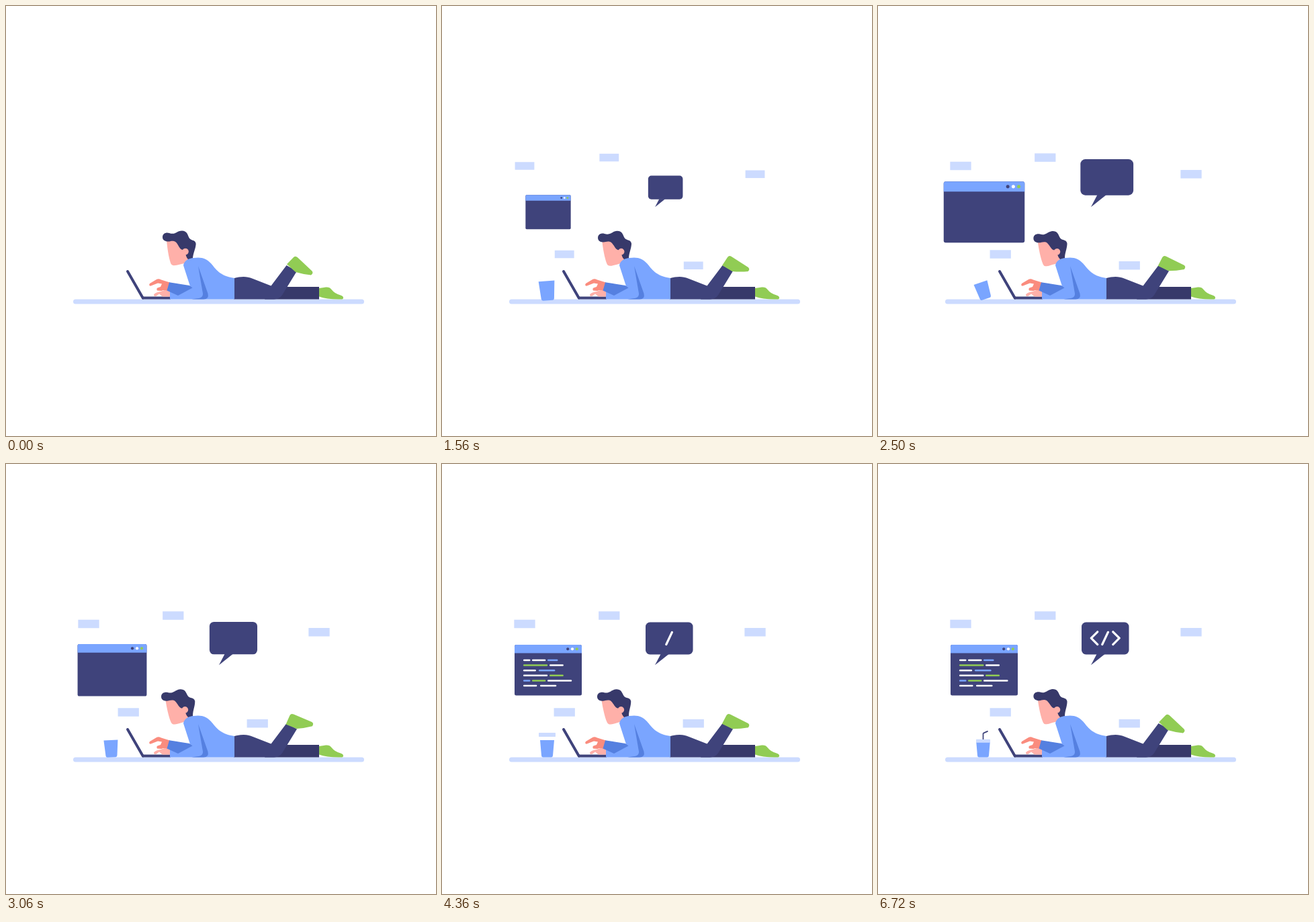
These frames come from a looping animation (640 by 640 pixels, 9.04 s). An HTML page:

```html
<!DOCTYPE html>
<html lang="en">
<head>
<meta charset="utf-8">
<title>Coding on the floor</title>
<style>
html, body { margin: 0; width: 100%; height: 100%; overflow: hidden; background: #fff; }
svg { display: block; width: 100vw; height: 100vh; }
.pale { fill: #ccdbff; }
.blue { fill: #7aa5ff; }
.deep { fill: #5580e0; }
.navy { fill: #3f437b; }
.dark { fill: #37396a; }
.skin { fill: #ffb0a9; }
.hand { fill: #fa8c7e; }
.green { fill: #91cc54; }
.line { fill: none; stroke-linecap: round; stroke-linejoin: round; }
</style>
</head>
<body>
<svg viewBox="0 0 640 640">
  <g id="tiles" class="pale"></g>

  <g id="window">
    <rect class="navy" x="108" y="269" width="100" height="75.5" rx="2.5"/>
    <path class="blue" d="M108 281.5V271.5Q108 269 110.5 269H205.5Q208 269 208 271.5V281.5Z"/>
    <circle class="navy" cx="187.2" cy="275.3" r="2.1"/>
    <circle fill="#fff" cx="194" cy="275.3" r="2.1"/>
    <circle class="green" cx="200.8" cy="275.3" r="2.1"/>
  </g>
  <g id="code" class="line" stroke-width="2.5"></g>

  <g id="bubble" class="navy">
    <rect x="303" y="235.5" width="70.5" height="48" rx="6.5"/>
    <path d="M325.5 283L317 299.3L337.5 283Z"/>
  </g>
  <g class="line" stroke="#fff" stroke-width="3.2">
    <path id="slash" pathLength="1" d="M333.8 268.5L342.4 250.3"/>
    <path id="open" d="M326.7 249.8L317.3 259.2L326.7 268.6"/>
    <path id="close" d="M349.8 249.8L359.2 259.2L349.8 268.6"/>
  </g>

  <rect class="pale" x="100" y="436.5" width="433" height="7" rx="3.5"/>

  <path id="cup" class="blue" d="M146 411H167L165 434Q164.8 436.5 162.5 436.5H150.5Q148.2 436.5 148 434Z"/>
  <rect id="lid" class="pale" x="146" y="409.7" width="21" height="5" rx=".6"/>
  <path id="straw" class="line" stroke="#3f437b" stroke-width="1.7" pathLength="1" d="M156.5 409.2V401.6Q156.5 400.7 157.4 400.4L163 397.9"/>

  <path class="line" stroke="#3f437b" stroke-width="4" d="M181 395L203.7 434.4"/>
  <path class="navy" d="M202 432.5H245V436.5H203Z"/>

  <path class="dark" d="M400 418H466V436.5H385Z"/>
  <path class="green" d="M466 420Q472 419.5 476 418.6Q481.500 418 484.500 422Q489 428 498 430.5Q502 431.6 502 434.2Q502 436.500 499 436.500Q478 437 466 432.500Z"/>
  <path class="navy" d="M339 405.200C350 402.300 358 402 367 405.700L394.500 416.500L417.500 386L433 394.500L411.500 429.500Q407 436.500 399 436.500H339Z"/>
  <path id="foot" class="green" d="M418 384.300L428 374Q431 371.300 434 374.300L455.500 394.500Q458 397.700 454 400.500Q442 399.300 431 396Z"/>

  <g id="head">
    <path class="skin" d="M239 348C240 360 242 374 245 382.500C246 386 249 386.500 252 386C257 385.300 262 383.500 266 383H272L270 366L262 348Z"/>
    <path class="dark" d="M233 344C233 338 239 336.500 243 338C252 341 253 335 262 334.500C269 335 270 339 272 344C274 350 282 347 282.700 354C282 363 278 368 278 377H271C268 374 268 371 267 368L263 363C257 362 256 351 250 350C245 349.300 244 351 240 350.500C236 350 233 348 233 344Z"/>
    <circle class="skin" cx="267" cy="365.500" r="4.800"/>
  </g>

  <path class="skin" d="M245 424L236 423L230 425Q222 426 220 429.500Q219.500 433 224 431.500L228 428.500L233 432.500H245Z"/>
  <path class="blue" d="M264 386C265 379 272 375.500 279 375C291 373 299 376 305 383C312 391 318 402 340 405V436.500H244V423L256 429L274 417Z"/>
  <path class="deep" d="M286 387L300.500 428Q302.500 436.500 294 436.500H276L288 434.800Q293.500 433 293 428Z"/>
  <path class="hand" d="M244 411.500L231 407.500Q227 405.300 224 407L214 413Q212 416 215 416.700L226 412.500L232 413.500L230 418L225.500 419.500Q223.500 421 225 423.500L231 424Q236 422 240 424Z"/>
  <path class="deep" d="M243 411.300L273 416L277.500 419.500L256 431L239.500 423.500Z"/>
</svg>
<script>
const $ = id => document.getElementById(id);
const LOOP = 9040;
const BEATS = [0, 120, 240, 360, 480, 600, 700, 740, 880, 1000];
const TILES = [[123, 238], [248.800, 225.600], [466, 250.300], [182.200, 369.500], [374.200, 386.200]];
const INK = { w: '#fff', b: '#7aa5ff', g: '#91cc54' };
// Each row: colour, left and right end of every dash
const ROWS = [
  ['w', 121, 131.5, 'w', 134, 154.5, 'b', 157, 172.5],
  ['g', 121, 157.5, 'w', 160, 181],
  ['w', 121, 140, 'b', 144, 168.5],
  ['w', 121, 157.5, 'g', 160, 181],
  ['b', 121, 131.5, 'g', 134, 154.5, 'w', 157, 193.5],
  ['w', 121, 141.5, 'w', 146, 170.5]
];

$('tiles').innerHTML = TILES.map(([x, y]) =>
  `<rect x="${x - 15.65}" y="${y - 6.25}" width="31.3" height="12.5"/>`).join('');

ROWS.forEach((row, r) => {
  for (let i = 0; i < row.length; i += 3) {
    const y = 292 + 7.6 * r;
    $('code').innerHTML += `<path pathLength="1" stroke="${INK[row[i]]}" d="M${row[i + 1] + 1.2} ${y}H${row[i + 2] - 1.2}"/>`;
  }
});

const mix = (a, b, p) => a + (b - a) * p;
// Eased progress of the ten steps that follow `start`
const ease = (n, start, power = 2) =>
  1 - (1 - Math.min(1, Math.max(0, (n - start) / 10))) ** power;
// From 0 to `peak`, then settling at 1
const pop = (n, start, peak, power) =>
  n < start + 10 ? peak * ease(n, start, power) : mix(peak, 1, ease(n, start + 10, power));

function pose(el, x, y, scale, angle = 0, dy = 0) {
  el.setAttribute('transform',
    `translate(${x} ${y + dy}) rotate(${angle}) scale(${scale}) translate(${-x} ${-y})`);
}

function trim(el, p) {
  el.style.visibility = p > 0 ? 'visible' : 'hidden';
  el.setAttribute('stroke-dasharray', p < 1 ? `${p} 2` : 'none');
}

function stepAt(t) {
  if (t < 120) return 0;
  const beat = Math.floor((t - 120) / 1120);
  const rest = (t - 120) % 1120;
  return Math.min(60, beat * 10 + BEATS.filter(b => b <= rest).length);
}

function draw(n) {
  const tileScale = pop(n, 0, 0.84);
  [...$('tiles').children].forEach((el, i) => pose(el, ...TILES[i], tileScale));

  const tilt = n < 10 ? 22 * ease(n, 0)
    : n < 20 ? mix(22, -29, ease(n, 10))
    : mix(-29, 0, ease(n, 20));
  pose($('cup'), 156.5, 423.6, pop(n, 0, 1.27), tilt);

  pose($('window'), 158, 306.7, pop(n, 10, 1.32));
  pose($('bubble'), 317.3, 299, pop(n, 10, 1.21, 2.6));

  const typed = ease(n, 30);
  for (const el of $('code').children) trim(el, typed);
  trim($('slash'), typed);
  pose($('lid'), 156.5, 412.2, pop(n, 30, 1.2), 0, -9.2 * (typed - ease(n, 40)));

  const spread = ease(n, 40);
  const inset = 12 * (1 - spread);
  $('open').setAttribute('transform', `translate(${inset})`);
  $('close').setAttribute('transform', `translate(${-inset})`);
  for (const id of ['open', 'close']) $(id).style.opacity = Math.min(1, spread * 2);

  trim($('straw'), ease(n, 50));

  const swing = 1 - Math.abs(n - 30) / 30;
  pose($('foot'), 426, 390, 1, -22 * swing ** 0.85);
  pose($('head'), 272, 375, 1, n < 30 ? -4.2 * swing : mix(-3, -4.2, swing));
}

function tick(now) {
  draw(stepAt(now % LOOP));
  requestAnimationFrame(tick);
}
draw(0);
requestAnimationFrame(tick);
</script>
</body>
</html>
```
